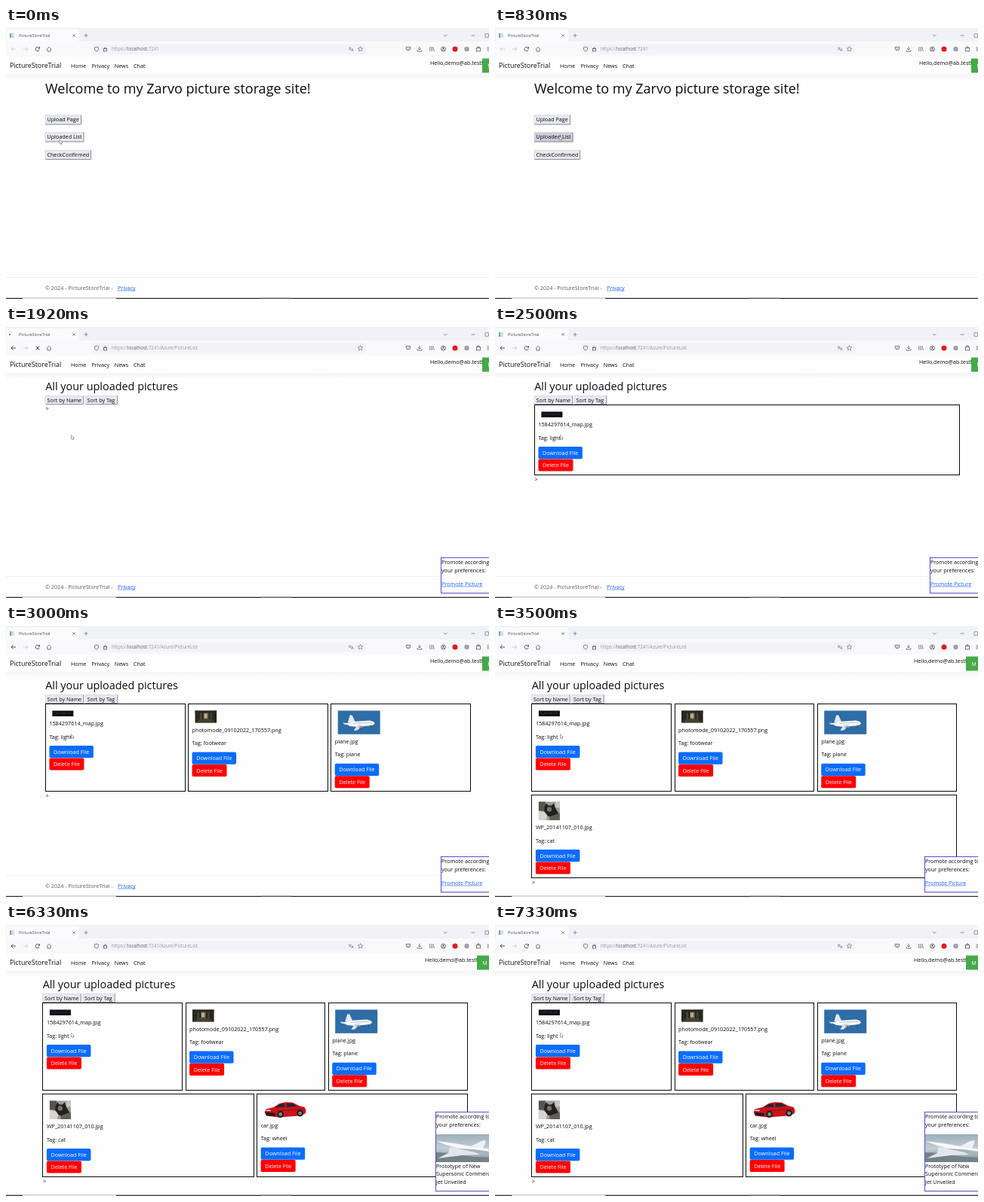
An HTML page with a canvas for the animation above (7.41 s loop, 640x360 px).

```html
<!DOCTYPE html>
<html lang="en">
<head>
<meta charset="utf-8">
<title>Picture storage</title>
<style>
html, body { margin: 0; width: 100%; height: 100%; overflow: hidden; background: #fefeff; }
canvas { display: block; width: 640px; height: 360px; }
</style>
</head>
<body>
<canvas id="stage" width="640" height="360"></canvas>
<script>
const g = document.getElementById('stage').getContext('2d');
const LOOP = 7410, TICK = 1000 / 12;
const FONT = '"Open Sans", "Noto Sans", sans-serif';
const SITE = 'PictureStoreTrial';
const INK = '#0c0c10', PAGE = '#fefeff', BLUE = '#0b6cfb', LINK = '#1f62e8';
const ICON = '#55555c', SOFT = '#74747c', PALE = '#c4c4cc';

// Times at which the page changes, in ms
const T = { hover: 80, move: 420, click: 1080, commit: 1500, page: 1670, tabDone: 2080, loaded: 2250,
  one: 2500, two: 2670, three: 3000, four: 3250, five: 3750, news: 5830, photo: 6330 };

const snap = v => Math.floor(v) + 0.5;

function rect(x, y, w, h, fill) {
  g.fillStyle = fill;
  g.fillRect(x, y, w, h);
}

function box(x, y, w, h, stroke, fill, lw = 1) {
  if (fill) rect(x, y, w, h, fill);
  g.strokeStyle = stroke;
  g.lineWidth = lw;
  g.strokeRect(x, y, w, h);
}

function round(x, y, w, h, r, fill) {
  g.fillStyle = fill;
  g.beginPath();
  g.roundRect(x, y, w, h, r);
  g.fill();
}

function line(pts, color, lw = 0.8) {
  g.strokeStyle = color;
  g.lineWidth = lw;
  g.beginPath();
  pts.forEach(([x, y], i) => i ? g.lineTo(x, y) : g.moveTo(x, y));
  g.stroke();
}

function poly(pts, fill) {
  g.fillStyle = fill;
  g.beginPath();
  pts.forEach(([x, y]) => g.lineTo(x, y));
  g.closePath();
  g.fill();
}

function disc(x, y, r, fill) {
  g.fillStyle = fill;
  g.beginPath();
  g.arc(x, y, r, 0, 7);
  g.fill();
}

function ring(x, y, r, color, a = 0, b = 6.3, lw = 0.8) {
  g.strokeStyle = color;
  g.lineWidth = lw;
  g.beginPath();
  g.arc(x, y, r, a, b);
  g.stroke();
}

// Text placed by its left edge and the middle of its capitals
function text(s, x, mid, size = 7.2, color = INK) {
  g.font = size + 'px ' + FONT;
  g.fillStyle = color;
  g.fillText(s, x, mid + size * 0.36);
  return x + g.measureText(s).width;
}

function link(s, x, mid) {
  const end = text(s, x, mid, 7.2, LINK);
  line([[x, mid + 3.9], [end, mid + 3.9]], LINK, 0.6);
}

function plainButton(s, x, y, w, h, hover) {
  rect(x, y, w, h, hover ? '#cdcdd9' : '#e8e8f1');
  line([[x, y + h - 0.5], [x + w - 0.5, y + h - 0.5], [x + w - 0.5, y]], '#8e8e98', 1);
  line([[x, y + h], [x, y + 0.4], [x + w, y + 0.4]], '#d4d4de', 0.7);
  text(s, x + 2.4, y + h / 2 - 0.1);
}

function star(x, y, r) {
  const pts = [];
  for (let i = 0; i <= 10; i++) {
    const a = i * Math.PI / 5 - Math.PI / 2, k = i % 2 ? r * 0.45 : r;
    pts.push([x + k * Math.cos(a), y + k * Math.sin(a)]);
  }
  line(pts, SOFT, 0.7);
}

function tabBar(t) {
  const loading = t >= T.click && t < T.tabDone;
  rect(0, 0, 640, 18, '#f1f1f8');
  round(1, 2, 96, 16, 2, '#fbfbfe');
  if (loading) disc(7.5 + 3 * Math.sin((t - T.click) / 160), 10, 1.1, ICON);
  else {
    rect(5, 7, 6, 6, '#d3dee6');
    rect(5, 7, 2, 6, '#7fa3a8');
  }
  text(SITE, 17, 10, 5.4, '#4c4c54');
  line([[88.3, 8.3], [91.7, 11.7]], SOFT);
  line([[91.7, 8.3], [88.3, 11.7]], SOFT);
  line([[103.5, 10], [108.5, 10]], SOFT);
  line([[106, 7.5], [106, 12.5]], SOFT);
  line([[580, 8.8], [582.3, 11.2], [584.6, 8.8]], SOFT);
  line([[616.5, 10], [621.5, 10]], SOFT);
  box(635, 7.8, 4.4, 4.4, SOFT, null, 0.7);
}

function navIcons(t) {
  const back = t >= T.commit ? '#2c2c32' : PALE;
  line([[13, 28], [7, 28]], back);
  line([[9.6, 25.4], [7, 28], [9.6, 30.6]], back);
  line([[23, 28], [29, 28]], PALE);
  line([[26.4, 25.4], [29, 28], [26.4, 30.6]], PALE);
  if (t >= T.click && t < T.loaded) {
    line([[39.6, 25.6], [44.4, 30.4]], INK);
    line([[44.4, 25.6], [39.6, 30.4]], INK);
  } else {
    ring(41.8, 28, 2.7, '#3c3c44', 0.3, 5.5);
    poly([[44.9, 24.8], [44.9, 27.6], [42.2, 27.4]], '#3c3c44');
  }
  line([[54, 28.3], [57, 25.2], [60, 28.3]], ICON);
  line([[55, 28], [55, 31], [59, 31], [59, 28]], ICON);
}

function address(t) {
  round(115, 21.5, 362, 13, 2, '#f2f2f8');
  line([[120, 25], [122.6, 26], [122.2, 29.4], [120, 31.2], [117.8, 29.4], [117.4, 26], [120, 25]], ICON, 0.7);
  box(129.4, 27.5, 4.2, 3.4, ICON, null, 0.8);
  ring(131.5, 27.2, 1.4, ICON, Math.PI, 6.3, 0.7);
  let x = text('https://', 140, 28, 6.2, '#9a9aa2');
  x = text('localhost', x, 28, 6.2, '#606068');
  text(':7241' + (t >= T.commit ? '/Azure/PictureList' : ''), x, 28, 6.2, '#9a9aa2');
  if (t < T.commit || t >= 2000) {
    text('文', 453.5, 27, 4.6, ICON);
    text('A', 457.6, 29.4, 4.8, ICON);
  }
  star(469.5, 28, 3.5);
}

function tools() {
  ring(533, 27, 2.8, ICON, 0, Math.PI);
  line([[530.2, 27], [530.2, 25.4], [535.8, 25.4], [535.8, 27]], ICON);
  line([[531.7, 27], [533, 28.3], [534.3, 27]], ICON, 0.7);
  line([[548, 24.8], [548, 29]], ICON);
  line([[546.2, 27.3], [548, 29.1], [549.8, 27.3]], ICON);
  line([[545, 29.5], [545, 31], [551, 31], [551, 29.5]], ICON);
  for (const x of [561.6, 563.4, 565.2]) line([[x, 25], [x, 31]], SOFT, 0.7);
  line([[566, 25.2], [567.6, 31]], SOFT, 0.7);
  ring(579.5, 28, 3, ICON);
  disc(579.5, 27, 1.1, ICON);
  ring(579.5, 30.5, 1.8, ICON, Math.PI, 6.3);
  disc(595, 28, 3.5, '#e01c20');
  disc(610.5, 28, 3.2, '#a2a2aa');
  box(623.5, 26.5, 5, 4.4, ICON, null, 0.8);
  ring(626, 26, 1.3, ICON, Math.PI, 6.3);
  for (const y of [26, 28, 30]) line([[637.4, y], [640, y]], ICON, 0.7);
}

function siteHeader(shift) {
  const fade = g.createLinearGradient(0, 61, 0, 69);
  fade.addColorStop(0, '#f4f4f9');
  fade.addColorStop(1, PAGE);
  rect(0, 61, 640, 8, fade);
  text(SITE, 5, 50, 8.9);
  text('Home', 86, 50);
  text('Privacy', 113.4, 50);
  text('News', 143.8, 50);
  text('Chat', 169, 50);
  rect(631 - shift, 40.5, 20, 19, '#44ab48');
  text('M', 638.3 - shift, 50, 7.2, '#fff');
  text('Hello,demo@ab.test!', 562 - shift, 46);
}

function footer() {
  rect(0, 331, 640, 1, '#f0f0f6');
  text('© 2024 - ' + SITE + ' -', 52, 345, 7.2, '#5c5c64');
  link('Privacy', 148, 345);
}

// Thumbnails; each is drawn from its own top left corner
const art = {
  map(w, h) {
    rect(0, 0, w, h, '#0d0d13');
    const pts = [];
    for (let x = 2; x < w - 2; x += 1.5) pts.push([x, h * 0.45 + 1.6 * Math.sin(x * 1.7) * Math.cos(x * 0.4)]);
    line(pts, '#3d4150', 0.7);
  },
  scene(w, h) {
    const s = g.createLinearGradient(0, 0, w, 0);
    s.addColorStop(0, '#1d1c16');
    s.addColorStop(0.5, '#6f6a50');
    s.addColorStop(1, '#1b1a15');
    rect(0, 0, w, h, s);
    rect(0, 0, w, 3, '#2c2a20');
    for (const x of [4, 9, 18, 23]) rect(x, 2, 2, h - 6, '#24221a');
    rect(12, 4, 4, 6, '#b5af90');
    poly([[0, h], [10, h - 5], [18, h - 5], [w, h]], '#45412f');
  },
  plane(w, h) {
    rect(0, 0, w, h, '#2f6da6');
    poly([[13, 16], [16, 6], [19, 6], [23, 15]], '#e4e8ee');
    poly([[6, 16], [14, 16.5], [16, 18], [9, 18.5]], '#d5dbe2');
    poly([[10, 17.5], [20, 14.5], [42, 13], [47, 14.5], [49, 17], [46, 19.5], [26, 21.5], [16, 20.5]], '#f8f9fb');
    poly([[26, 18.5], [34, 18], [26, 26], [21, 26.5]], '#dbe0e6');
    line([[20, 16.8], [45, 15.6]], '#8ba0b6', 0.6);
    round(28, 20.5, 5, 2.8, 1.4, '#909aa8');
    line([[31, 22], [31, 25]], '#283c52');
    line([[44, 19.5], [44, 23]], '#283c52');
  },
  cat(w, h) {
    rect(0, 0, w, h, '#9c9c98');
    rect(0, 0, 9, 12, '#55544e');
    poly([[0, 12], [12, 15], [10, h], [0, h]], '#d4d4d2');
    poly([[8, 6], [10, 2], [13, 5], [17, 5], [20, 2], [22, 8], [26, 15], [24, 22], [12, 19], [7, 12]], '#23221f');
    disc(14, 10, 3.2, '#77736a');
    rect(22, 0, 6, 8, '#c6c6c6');
    poly([[14, 20], [28, 15], [28, h], [15, h]], '#625f56');
  },
  car(w, h) {
    poly([[3, 11], [13, 8.6], [21, 3.6], [29, 1.8], [38, 2.2], [47, 6.8], [54, 8.6], [56, 13], [55, 17], [46, 20], [20, 22], [3, 20], [1, 15]], '#c9151c');
    poly([[14, 8.8], [21.5, 4.6], [27, 3.4], [28, 8.6]], '#25262c');
    poly([[30, 3.4], [38, 3.6], [44, 7.4], [30, 8.6]], '#25262c');
    poly([[2, 15], [15, 16.5], [15, 20.5], [4, 19.6]], '#26161a');
    line([[17, 13.6], [54, 11]], '#7e0e14', 0.8);
    for (const [x, y] of [[22, 18], [48, 16.5]]) {
      disc(x, y, 4.4, '#1b1b1e');
      disc(x, y, 2.4, '#85858c');
    }
    rect(3, 12.2, 6, 1.4, '#f2eef0');
  },
  jet(w, h) {
    const s = g.createLinearGradient(0, 0, 0, h);
    s.addColorStop(0, '#9bb0bc');
    s.addColorStop(0.5, '#c3ccd2');
    s.addColorStop(1, '#84929a');
    rect(0, 0, w, h, s);
    poly([[0, 24], [20, 25], [50, 30], [w, 31], [w, h], [0, h]], '#728288');
    poly([[0, 9], [24, 12], [52, 17], [w, 21], [w, 26], [42, 22], [16, 15]], '#f7f8fa');
    poly([[18, 17], [44, 20], [58, 27], [34, 28], [2, 32], [16, 25]], '#e1e6ea');
    poly([[28, 19], [50, 20], [w, 24], [w, 28], [52, 24]], '#a8b4bc');
    poly([[46, 16], [62, 8], [66, 9], [62, 19]], '#eef1f4');
  }
};

function picture(kind, x, y, w, h) {
  g.save();
  g.translate(x, y);
  art[kind](w, h);
  g.restore();
}

const items = [
  ['map', 28, 7.5, '1584297614_map.jpg', 'light'],
  ['scene', 28.5, 16, 'photomode_09102022_170557.png', 'footwear'],
  ['plane', 56, 31.3, 'plane.jpg', 'plane'],
  ['cat', 28, 24.5, 'WP_20141107_010.jpg', 'cat'],
  ['car', 57, 23, 'car.jpg', 'wheel']
];

function card([kind, iw, ih, name, tag], x, y, w, h) {
  const left = snap(x);
  box(left, y, snap(x + w) - left, h, '#0a0a0c', PAGE);
  picture(kind, x + 9, y + 9, iw, ih);
  const mid = y + ih + 18.5;
  text(name, x + 5, mid);
  text('Tag: ' + tag, x + 5, mid + 17.5);
  round(x + 5, mid + 29.5, 58.5, 16.2, 1.8, BLUE);
  text('Download File', x + 10.6, mid + 37.6, 7.2, '#fff');
  round(x + 5, mid + 46, 46, 16, 1.8, '#ff0004');
  text('Delete File', x + 10.6, mid + 54, 7.2, '#fff');
}

function cards(n, x) {
  const gap = 4.5, full = 563;
  let y = 103.5;
  for (let i = 0; i < n; i += 3) {
    const row = items.slice(i, Math.min(i + 3, n));
    const w = (full - gap * (row.length - 1)) / row.length;
    const h = Math.floor(Math.max(...row.map(r => r[2])) + 85.5);
    row.forEach((r, k) => card(r, x + k * (w + gap), y, w, h));
    y += h + 5;
  }
  text('>', x, n ? y + 1 : 108);
}

function promo(t, x) {
  const news = t >= T.news, photo = t >= T.photo;
  const top = photo ? 249 : news ? 274 : 307;
  box(x - 0.5, top - 0.5, 90, 354 - top, '#4240c8', PAGE, 0.9);
  text('Promote according to', x, top + 5.7);
  text('your preferences:', x, top + 16.3);
  if (!news) return link('Promote Picture', x, 341);
  if (photo) picture('jet', x, 278, 80, 37);
  text('Prototype of New', x, 320.4);
  text('Supersonic Commercial', x, 330.8);
  text('Jet Unveiled', x, 341.2);
}

function homePage(t) {
  text('Welcome to my Zarvo picture storage site!', 52, 81, 18);
  plainButton('Upload Page', 52, 115.5, 48, 13);
  plainButton('Uploaded List', 52, 138.5, 51.5, 13, t >= T.hover);
  plainButton('CheckConfirmed', 52, 162, 61, 13);
  footer();
  if (t >= T.click) {
    rect(0, 349, 115, 10, '#f4f4f9');
    text('localhost', 2, 354, 5.4, ICON);
  }
}

function listPage(t, shift) {
  const x = 52.2 - shift / 2;
  const n = [T.one, T.two, T.three, T.four, T.five].filter(s => t >= s).length;
  if (n < 4) footer();
  text('All your uploaded pictures', x, 79, 14.4);
  plainButton('Sort by Name', x, 91, 51, 12.2);
  plainButton('Sort by Tag', x + 53, 91, 43, 12.2);
  cards(n, x + 0.2);
  promo(t, 577 - shift);
}

function pointer(t) {
  const step = Math.floor(t / TICK) * TICK;
  const k = Math.min(1, Math.max(0, (step - T.move + TICK) / 500));
  const e = k * k * (3 - 2 * k);
  const rise = Math.min(1, t / 250);
  const x = 71 - rise + 16.5 * e, y = 148.5 - 3 * rise - 2 * e;
  const pts = [[0, 0], [0, 5.6], [1.4, 4.4], [2.2, 6.4], [3.1, 6], [2.3, 4.1], [4, 4]].map(([a, b]) => [x + a, y + b]);
  poly(pts, '#fff');
  line([...pts, pts[0]], '#5a5a60', 0.5);
}

function draw(t) {
  const shift = t >= T.four ? 7 : 0;
  rect(0, 0, 640, 360, PAGE);
  siteHeader(shift);
  if (t < T.page) homePage(t);
  else listPage(t, shift);
  tabBar(t);
  rect(0, 18, 640, 20, '#f9f9fc');
  navIcons(t);
  address(t);
  tools();
  rect(0, 358.6, 640, 1.4, '#3c3c42');
  rect(22, 358.6, 124, 1.4, '#eaeaf0');
  rect(338, 358.6, 40, 1.4, '#77777e');
  pointer(t);
}

const start = performance.now();
function frame() {
  draw((performance.now() - start) % LOOP);
  requestAnimationFrame(frame);
}
frame();
</script>
</body>
</html>
```
